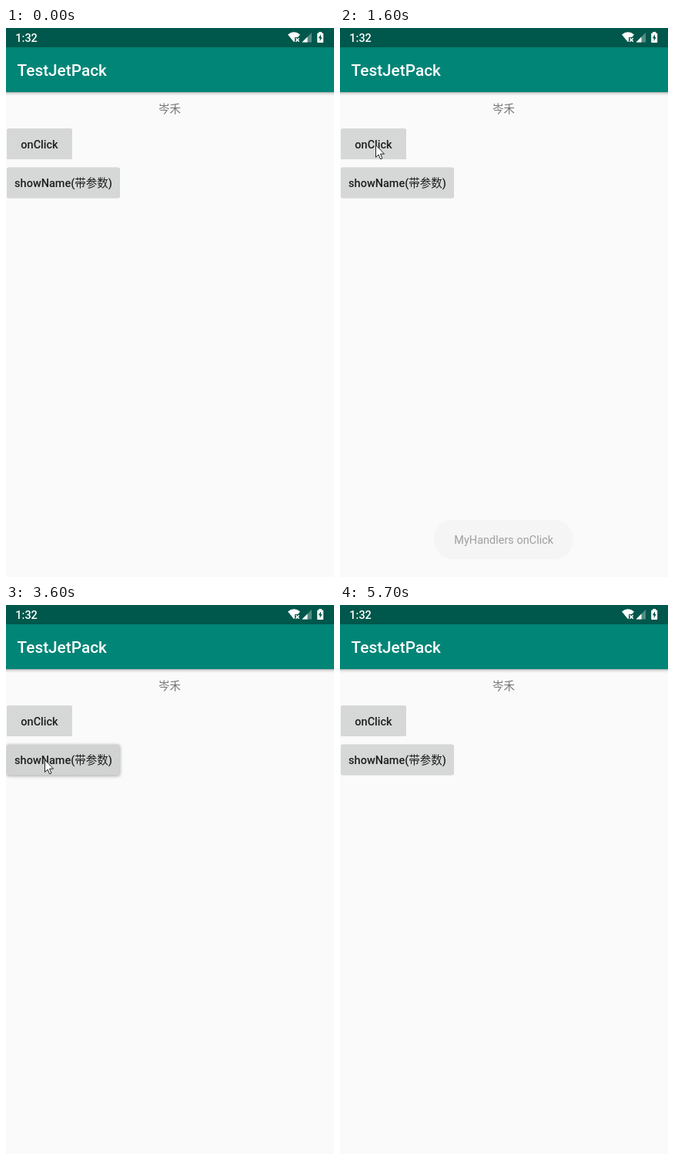
An HTML page for the animation above (5.9 s loop, 426 by 711 pixels).

```html
<!DOCTYPE html>
<html lang="zh">
<head>
<meta charset="utf-8">
<title>TestJetPack</title>
<style>
  html, body { margin: 0; width: 100%; height: 100%; overflow: hidden; background: #fafafa; }
  svg { display: block; width: 426px; height: 711px; }
  text { font: 400 14.5px Roboto, "Noto Sans CJK SC", "Noto Sans CJK", sans-serif; }
  .medium { font-weight: 500; }
  .mid { text-anchor: middle; }
  .label { fill: #1f1f1f; }
</style>
</head>
<body>
<svg viewBox="0 0 426 711">
  <defs>
    <linearGradient id="shade" x2="0" y2="1">
      <stop offset="0" stop-color="#000" stop-opacity=".3"/>
      <stop offset=".4" stop-color="#000" stop-opacity=".1"/>
      <stop offset="1" stop-color="#000" stop-opacity="0"/>
    </linearGradient>
  </defs>
  <rect width="426" height="711" fill="#fafafa"/>

  <!-- app bar -->
  <rect y="83" width="426" height="5" fill="url(#shade)"/>
  <rect y="24" width="426" height="59" fill="#008577"/>
  <text class="medium" x="14.5" y="62" fill="#fff" style="font-size:20.8px">TestJetPack</text>

  <!-- status bar -->
  <rect width="426" height="25" fill="#00574b"/>
  <text id="clock" class="medium" x="12.3" y="18" fill="#fff">1:32</text>
  <g fill="#fff">
    <path d="M366 8.6Q374 2 382 8.6L379.2 12H375V17.2L374 18.3Z"/>
    <path d="M376.3 13.2l4.4 4.4m0-4.4l-4.4 4.4" stroke="#fff" stroke-width="1.5"/>
    <path d="M384.5 18.5L397 6V18.5Z" opacity=".32"/>
    <path d="M384.5 18.5L391.5 11.5V18.5Z"/>
    <path d="M406.4 5h3.6v1.4h1.4q.8 0 .8.8v11q0 .8-.8.8h-6.4q-.8 0-.8-.8v-11q0-.8.8-.8h1.4z"/>
    <path d="M409 8.3L405.8 13.3H407.7V17L410.7 11.9H409Z" fill="#00574b"/>
  </g>

  <text class="mid" x="212.5" y="109.5" fill="#757575">岑禾</text>

  <rect id="btn1" x="1" y="130.5" width="85" height="39.5" rx="2"/>
  <text class="medium label mid" x="43.5" y="155.5">onClick</text>
  <rect id="btn2" x="1" y="180.8" width="146.7" height="39.5" rx="2"/>
  <text class="medium label mid" x="74.5" y="205.8">showName(带参数)</text>

  <g id="toast1">
    <rect x="122" y="636.7" width="181" height="51.3" rx="25" fill="#efefef"/>
    <text class="mid" x="212.7" y="668.4" fill="#333">MyHandlers onClick</text>
  </g>
  <g id="toast2">
    <rect x="172.5" y="636.7" width="80" height="51.3" rx="25" fill="#efefef"/>
    <text class="mid" x="212.5" y="668.2" fill="#333">岑禾</text>
  </g>

  <path id="cursor" d="M.5.6V16.4L4.1 13L6.6 18.8L9 17.7L6.5 12.1H11.5Z" fill="#fff" stroke="#222" stroke-width="1"/>
</svg>
<script>
const LOOP = 5900, STEP = 100;
const $ = id => document.getElementById(id);

// pointer stops: [time, x, y]
const path = [
  [300, 377, 118], [400, 281, 167], [500, 162, 167], [600, 102, 158],
  [700, 65, 152], [800, 49, 150], [900, 47, 150], [1000, 46, 151],
  [2400, 46, 155], [2500, 47, 168], [2600, 49, 187], [2700, 50, 198],
  [2800, 50, 200], [4300, 51, 201], [4700, 110, 203], [4800, 252, 203],
  [4900, 359, 196]
];
const rise = [0.2, 0.45, 0.7, 0.88, 1];
const fall = [0.8, 0.5, 0.2, 0];
const press = [0.5, 1, 1, 0.4, 0];

const within = (t, a, b) => t >= a && t < b;
const pick = (list, t, start) => list[Math.min(list.length - 1, (t - start) / STEP)];

function toastAlpha(t, start) {
  const end = start + 1700;
  if (t < start) return 0;
  return t < end ? pick(rise, t, start) : pick(fall, t, end);
}

function drawButton(id, t, start) {
  const p = t < start ? 0 : pick(press, t, start);
  const g = Math.round(215 - 5 * p);
  $(id).setAttribute("fill", `rgb(${g - 1},${g},${g})`);
  $(id).style.filter =
    `drop-shadow(0 ${0.6 + p}px ${0.7 + 1.6 * p}px rgba(0,0,0,${0.25 + 0.12 * p}))`;
}

function draw(time) {
  const t = Math.floor(time % LOOP / STEP) * STEP;
  $("clock").textContent = within(t, 100, 300) || within(t, 4900, 5100) ? "6:32" : "1:32";

  const shown = within(t, 300, 5000);
  $("cursor").style.display = shown ? "" : "none";
  if (shown) {
    const [, x, y] = path.filter(p => p[0] <= t).pop();
    $("cursor").setAttribute("transform", `translate(${x} ${y})`);
  }

  drawButton("btn1", t, 1200);
  drawButton("btn2", t, 3400);
  $("toast1").setAttribute("opacity", toastAlpha(t, 1500));
  $("toast2").setAttribute("opacity", toastAlpha(t, 3700));
}

const begin = performance.now();
function tick() {
  draw(performance.now() - begin);
  requestAnimationFrame(tick);
}
tick();
</script>
</body>
</html>
```
